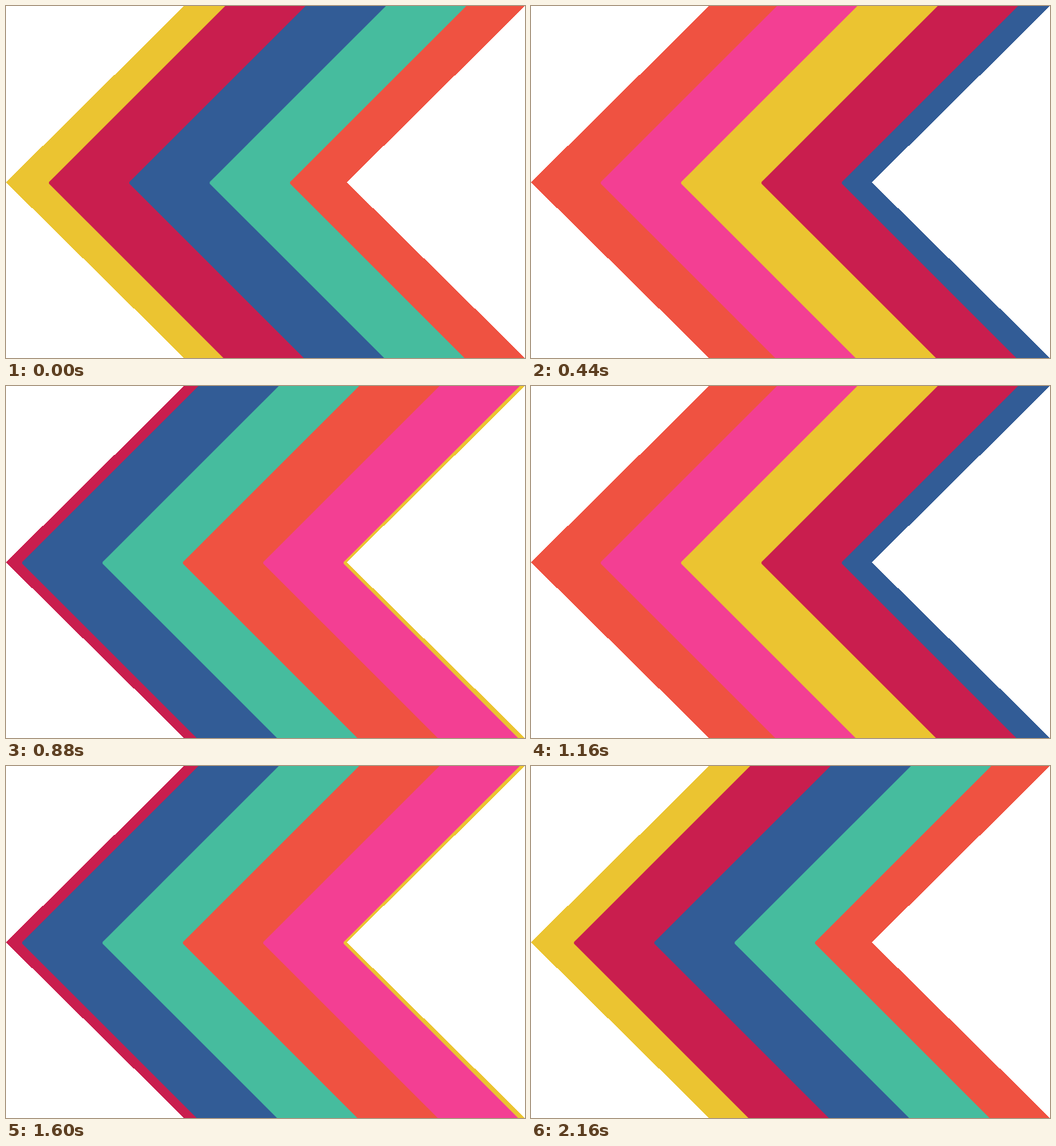
Write an HTML page that moves like this. It is 775x526 px and loops after 2.2 s.

```html
<!DOCTYPE html>
<html lang="en">
<head>
<meta charset="utf-8">
<title>Chevron stripes</title>
<style>
  html, body { margin: 0; width: 100%; height: 100%; overflow: hidden; background: #fff; }
  svg { display: block; width: 775px; height: 526px; }
</style>
</head>
<body>
<svg viewBox="0 0 775 526">
  <g id="stripes"></g>
  <g fill="#fff" shape-rendering="crispEdges">
    <path d="M0 0H266L0 263.5L266 526H0Z"/>
    <path d="M775 0L509 263.5L775 526Z"/>
  </g>
</svg>
<script>
  const colors = ['#ebc431', '#c91e4e', '#325c96', '#46bc9e', '#ef5241', '#f33f93'];
  const pitch = 120, firstTip = -57, tipY = 264.3, bevel = 1.2;
  const height = 526, farRight = 3600, count = 24;
  const loop = 2200, frame = 40, speed = 1; // px per ms
  const stripes = document.getElementById('stripes');

  // Each stripe covers everything to its right; the next one paints over it.
  for (let i = 0; i < count; i++) {
    const x = firstTip + i * pitch;
    const path = document.createElementNS('http://www.w3.org/2000/svg', 'path');
    path.setAttribute('fill', colors[i % colors.length]);
    path.setAttribute('d',
      `M${farRight} 0H${x + tipY}L${x + bevel} ${tipY - bevel}v${2 * bevel}` +
      `L${x + height - tipY} ${height}H${farRight}Z`);
    stripes.append(path);
  }

  stripes.animate(
    [{ transform: 'translateX(0px)' }, { transform: `translateX(${-loop * speed}px)` }],
    { duration: loop, iterations: Infinity, easing: `steps(${loop / frame}, end)` }
  );
</script>
</body>
</html>
```
